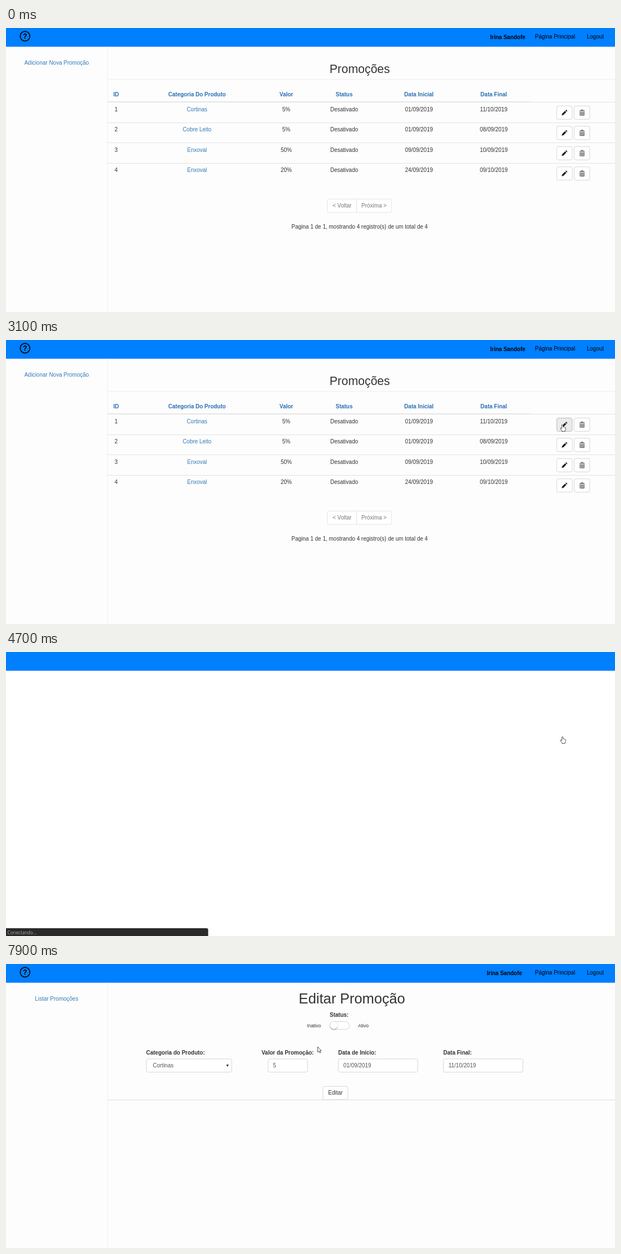
An HTML page with a canvas that plays this animation: 1095x511 px, repeating every 8 s.

```html
<!DOCTYPE html>
<html lang="pt">
<head>
<meta charset="utf-8">
<style>
html, body { margin: 0; width: 100%; height: 100%; overflow: hidden; background: #fff; }
canvas { display: block; }
</style>
</head>
<body>
<canvas width="1095" height="511"></canvas>
<script>
const ctx = document.querySelector('canvas').getContext('2d');
const LINK = '#337ab7', INK = '#333';
const SANS = '"Liberation Sans", Arial, sans-serif';
const USER = 'Irina Sandofe';

const columns = [[198, 'ID'], [343.5, 'Categoria Do Produto'], [504, 'Valor'],
  [608, 'Status'], [742.5, 'Data Inicial'], [877, 'Data Final']];
const rows = [
  ['1', 'Cortinas', '5%', 'Desativado', '01/09/2019', '11/10/2019'],
  ['2', 'Cobre Leito', '5%', 'Desativado', '01/09/2019', '08/09/2019'],
  ['3', 'Enxoval', '50%', 'Desativado', '09/09/2019', '10/09/2019'],
  ['4', 'Enxoval', '20%', 'Desativado', '24/09/2019', '09/10/2019']];

// Pointer moves: start time, steps of 100 ms, control point, end point
const moves = [
  [400, 4, 300, 70, 472.5, 168],
  [900, 3, 560, -4, 640, 181],
  [1700, 3, 780, 160, 846, 154],
  [2200, 5, 917, 154.7, 975.5, 149],
  [2800, 4, 985, 150, 1000.5, 152],
  [5400, 8, 960, 134, 683, 154],
  [6300, 5, 686, 160.7, 594, 113],
  [6900, 2, 594.5, 112, 594, 111],
  [7700, 3, 578, 122, 560.5, 149]];

// Browser status bar: start time, text, width, opacity
const statuses = [
  [0, '', 0, 0],
  [3300, 'servidor/painel/descontos/editar/1', 144, .6],
  [3400, 'servidor/painel/descontos/editar/1', 144, 1],
  [4000, 'Conectando...', 363.5, 1],
  [4400, 'Aguardando servidor...', 363.5, 1],
  [4700, 'Conectando...', 363.5, 1],
  [4900, 'Aguardando servidor...', 363.5, 1],
  [5000, 'Aguardando base.rovumi.lan...', 363.5, 1],
  [5300, 'Aguardando base.rovumi.lan...', 363.5, .8],
  [5400, '', 0, 0]];

const shapes = {
  pencil: new Path2D('M-5 5L-4.2 1.9L1 -3.3L3.3 -1L-1.9 4.2ZM1.7 -4L2.6 -4.9Q3 -5.2 3.4 -4.9L4.9 -3.4Q5.2 -3 4.9 -2.6L4 -1.7Z'),
  can: new Path2D('M-4.6 -3.3H4.6M-1.6 -3.6V-5H1.6V-3.6M-3.7 -2V4.9H3.7V-2M-1.8 -1.7V4M0 -1.7V4M1.8 -1.7V4'),
  arrow: new Path2D('M0 0V9.6L2.2 7.6L3.8 11L5.3 10.3L3.8 7.1H6.6Z'),
  hand: new Path2D('M-1.2 7.4V1Q0 -.8 1.1 1V4.4Q2.2 3.6 2.9 4.8Q4 4.2 4.4 5.3Q5.6 5 5.7 6.4V8.6Q5.6 10.4 4.6 11V12.6H-.6V11.6L-3.8 7.6Q-3.9 6 -2.4 6.3Z')
};

function text(str, x, y, { size = 10, color = INK, bold = false, align = 'left', family = SANS } = {}) {
  ctx.font = `${bold ? 'bold ' : ''}${size}px ${family}`;
  ctx.fillStyle = color;
  ctx.textAlign = align;
  ctx.fillText(str, x, y);
}

function rect(x, y, w, h, color) {
  ctx.fillStyle = color;
  ctx.fillRect(x, y, w, h);
}

function box(x, y, w, h, { radius = 3, fill = '#fff', stroke = '#ccc' } = {}) {
  ctx.beginPath();
  ctx.roundRect(x, y, w, h, radius);
  ctx.fillStyle = fill;
  ctx.fill();
  ctx.lineWidth = .8;
  ctx.strokeStyle = stroke;
  ctx.stroke();
}

function shape(name, x, y, fill, stroke, width = .9) {
  ctx.save();
  ctx.translate(x, y);
  ctx.lineWidth = width;
  ctx.lineJoin = 'round';
  if (fill) { ctx.fillStyle = fill; ctx.fill(shapes[name]); }
  if (stroke) { ctx.strokeStyle = stroke; ctx.stroke(shapes[name]); }
  ctx.restore();
}

function frame(userX, sideLink) {
  rect(0, 34, 1095, 477, '#fdfdfd');
  rect(182, 34, 1, 477, '#f0f0f0');
  ctx.beginPath();
  ctx.arc(34.2, 14.8, 8.7, 0, 7);
  ctx.lineWidth = 1.7;
  ctx.strokeStyle = '#000';
  ctx.stroke();
  text('?', 34.2, 19.3, { size: 13, bold: true, color: '#000', align: 'center' });
  text(USER, userX, 20, { bold: true, color: '#000' });
  text('Página Principal', 951, 19, { color: '#000' });
  text('Logout', 1044.5, 19, { color: '#000' });
  text(sideLink, 91, 65.5, { color: LINK, align: 'center' });
}

function listPage(hover, pressed) {
  frame(870.5, 'Adicionar Nova Promoção');
  text('Promoções', 636, 81, { size: 21.43, align: 'center' });
  rect(182, 92, 913, 1, '#eee');
  rect(182, 132.4, 760.5, 1.2, '#d8d8d8');
  rect(942.5, 133, 152.5, .8, '#ddd');
  for (const [x, label] of columns) text(label, x, 122.5, { bold: true, color: '#2a6fb3', align: 'center' });
  rows.forEach((row, i) => {
    const y = 36.5 * i;
    if (i) rect(182, Math.round(133 + y), 913, 1, '#e2e2e2');
    row.forEach((cell, c) => text(cell, columns[c][0], 149.5 + y, { color: c === 1 ? LINK : INK, align: 'center' }));
    const lit = hover && !i;
    box(990.3, 140.3 + y, 27.8, 24, lit
      ? { fill: pressed ? '#e6e6e6' : '#ebebeb', stroke: pressed ? '#999' : '#adadad' } : {});
    box(1021.6, 140.3 + y, 28, 24);
    shape('pencil', 1004.2, 152.2 + y, '#222');
    shape('can', 1035.8, 152.2 + y, null, INK);
  });
  box(577.8, 307.8, 115.6, 24, { stroke: '#ddd' });
  rect(630, 308, .8, 24, '#ddd');
  text('< Voltar', 604.3, 323.3, { color: '#777', align: 'center' });
  text('Próxima >', 661.7, 323.3, { color: '#777', align: 'center' });
  text('Pagina 1 de 1, mostrando 4 registro(s) de um total de 4', 635.8, 361, { align: 'center' });
}

function field(label, labelX, x, w, value, valueX) {
  text(label, labelX, 163.3, { bold: true });
  box(x, 170.8, w, 23.8);
  text(value, valueX, 186.2, { color: '#555' });
}

function formPage() {
  frame(864.5, 'Listar Promoções');
  text('Editar Promoção', 622, 71.3, { size: 25.7, align: 'center' });
  text('Status:', 599, 95.3, { bold: true, align: 'center' });
  text('Inativo', 541, 114.2, { size: 8.57 });
  text('Ativo', 633, 114.2, { size: 8.57 });
  box(582.3, 103.6, 35.2, 14, { radius: 7 });
  ctx.save();
  ctx.shadowColor = 'rgba(0,0,0,.4)';
  ctx.shadowBlur = 2;
  ctx.shadowOffsetY = .8;
  ctx.beginPath();
  ctx.arc(589.4, 110.3, 6.8, 0, 7);
  ctx.fillStyle = '#fff';
  ctx.fill();
  ctx.restore();
  field('Categoria do Produto:', 252, 252.3, 153.5, 'Cortinas', 264);
  field('Valor da Promoção:', 459.5, 471.2, 71, '5', 480);
  field('Data de Início:', 597.3, 597.4, 143, '01/09/2019', 606.5);
  field('Data Final:', 786.3, 786.4, 143, '11/10/2019', 795.7);
  ctx.fillStyle = INK;
  ctx.fill(new Path2D('M396 181H400.6L398.3 185Z'));
  rect(182, 244, 913, 1, '#ddd');
  box(569.9, 220.2, 44.8, 24);
  text('Editar', 592.3, 235.3, { align: 'center' });
}

function statusBar(t) {
  const [, label, width, alpha] = statuses.findLast(s => t >= s[0]);
  if (!width) return;
  ctx.save();
  ctx.globalAlpha = alpha;
  ctx.beginPath();
  ctx.roundRect(0, 497, width, 14, [0, 3, 0, 0]);
  ctx.fillStyle = '#2a2a2a';
  ctx.fill();
  text(label, 2.5, 507.6, { size: 8.2, color: '#aaa', family: '"Open Sans", "Noto Sans", sans-serif' });
  ctx.restore();
}

function pointer(t) {
  let x = 16, y = -9;
  for (const [start, steps, cx, cy, ex, ey] of moves) {
    if (t < start) break;
    const u = Math.min(1, (Math.floor((t - start) / 100) + 1) / steps), v = 1 - u;
    x = v * v * x + 2 * u * v * cx + u * u * ex;
    y = v * v * y + 2 * u * v * cy + u * u * ey;
  }
  return [x, y];
}

function draw(t) {
  const [x, y] = pointer(t);
  const onButton = x > 990;
  const onSwitch = t > 4900 && x > 582 && x < 618 && y > 103 && y < 118;
  rect(0, 0, 1095, 511, '#fff');
  rect(0, 0, 1095, 33.7, '#007fff');
  if (t < 4700) listPage(onButton, t >= 3600);
  else if (t >= 4900) formPage();
  statusBar(t);
  shape(onButton || onSwitch ? 'hand' : 'arrow', x, y, '#fff', '#223', .8);
}

function tick() {
  draw(performance.now() % 8000);
  requestAnimationFrame(tick);
}
tick();
</script>
</body>
</html>
```
